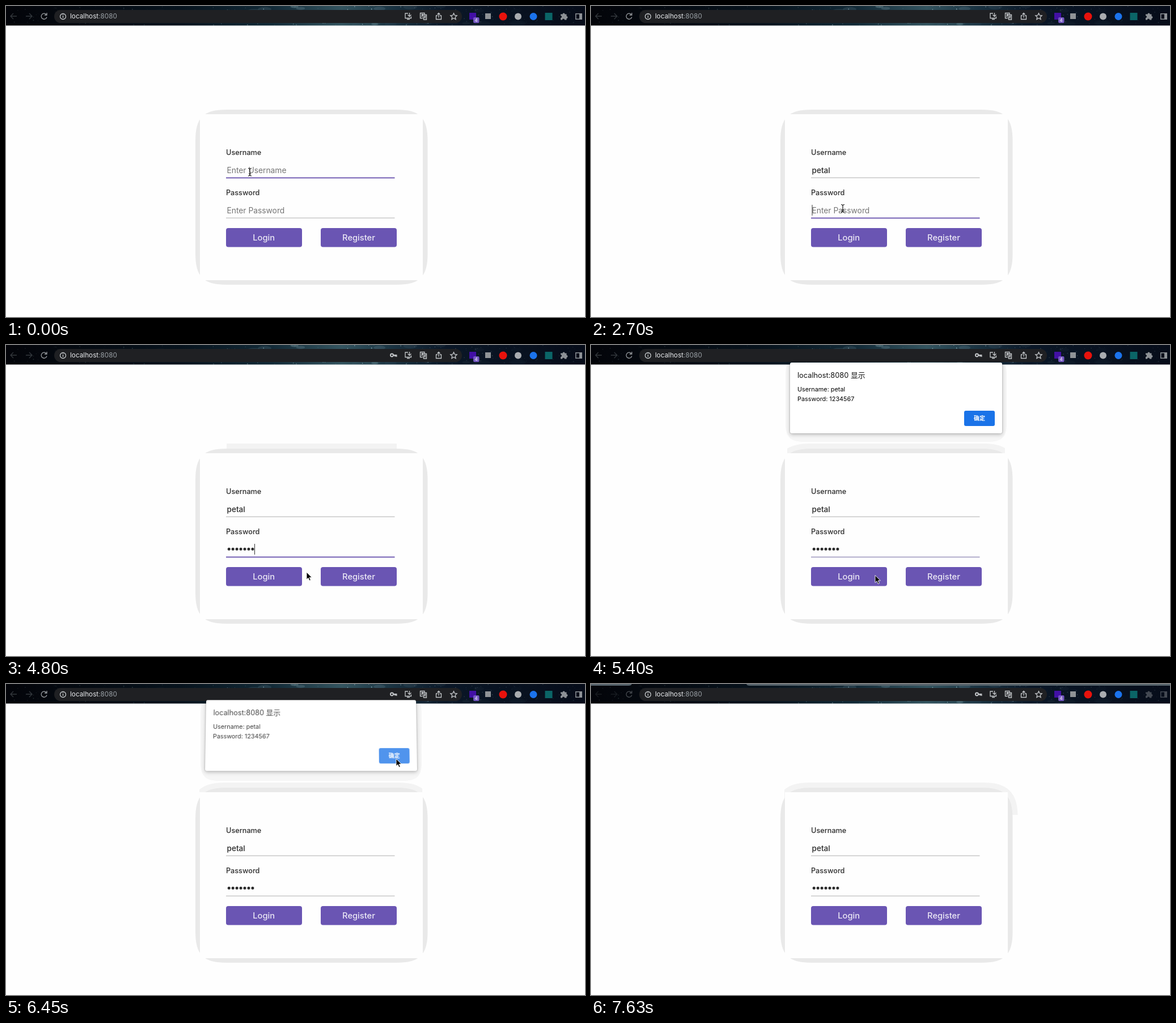
Recreate the animation shown at these times as an HTML page. Size 1021 px wide and 549 px high, loop 7730 ms.

```html
<!DOCTYPE html>
<html lang="en">
<head>
<meta charset="utf-8">
<title>Login form</title>
<style>
  html, body { margin: 0; width: 100%; height: 100%; overflow: hidden; background: #fefefe; }
  body { position: relative; font-family: Inter, "Noto Sans CJK SC", "Noto Sans CJK", sans-serif; }
  svg { position: absolute; left: 0; top: 0; }
  .label { font-size: 12.7px; font-weight: 500; fill: #2c2c2c; }
  .field { font-size: 13.8px; fill: #757575; }
  .typed { fill: #2a2a2a; font-weight: 500; font-size: 13.6px; }
  .button { font-size: 14.7px; font-weight: 500; fill: #ebe8f5; text-anchor: middle; }
  .icon { fill: none; stroke: #c4c7ca; stroke-width: 1.3; }
  #dialog {
    position: absolute; left: 351px; top: 31px; width: 374px; height: 125px;
    background: #fff; border-radius: 3px; transform-origin: 50% 100%;
    box-shadow: 0 0 2px rgba(0,0,0,.35), 0 2px 7px rgba(0,0,0,.25);
  }
  #dialog.tilted { transform: translateY(-2.5px) scaleY(1.016) perspective(1000px) rotateX(5deg); }
  #dialog.tilted svg { opacity: .76; }
</style>
</head>
<body>
<svg width="1021" height="549">
  <defs>
    <linearGradient id="sky">
      <stop offset="0" stop-color="#030409"/>
      <stop offset=".3" stop-color="#07131d"/>
      <stop offset=".46" stop-color="#122a37"/>
      <stop offset=".58" stop-color="#33545f"/>
      <stop offset=".66" stop-color="#1b3543"/>
      <stop offset=".76" stop-color="#0a1727"/>
      <stop offset="1" stop-color="#060c19"/>
    </linearGradient>
    <clipPath id="clip"><rect id="reveal"/></clipPath>
  </defs>

  <path id="dialogHalo" fill="#f6f6f6"/>
  <rect width="1021" height="34.500" fill="url(#sky)"/>
  <g id="stars"></g>
  <path id="tabs" d="M0 0H72Q71 3 66 3H0ZM274 0H1021V3H280Q275 3 274 0Z" fill="#56636b"/>
  <rect x="85" y="7" width="719" height="23" rx="11.5" fill="#1f2023"/>

  <g id="nav" class="icon">
    <path d="M19 18H8m5-5-5 5 5 5M35 18h11m-5-5 5 5-5 5" stroke="#33383d"/>
    <path d="M71 15a5 5 0 1 0 1 4.500M72 12v4h-4" stroke="#969a9e"/>
  </g>
  <g class="icon" stroke-width="1.2">
    <path d="M100.500 17v4M100.500 14.500v1.300"/><circle cx="100.500" cy="18.500" r="5"/>
    <path id="key" d="M683 18h5.500v3M686 18v2.500M683 18a2.500 2.500 0 1 0-5 0a2.500 2.500 0 1 0 5 0" stroke-width="1.900"/>
    <path d="M709 13h-5v8.500h10.500v-3M707 23.500h5M711.500 12v6m-3-2.500 3 3 3-3"/>
    <path d="M738 15v-2.500h-7.500v9h4M735 15.500h6.500v8.500h-5zM732.500 15h3.500M734 14v1q0 3-2 4M737 18h3.500m-1.500-1v1q0 2-2 3.500m1-2 2 2"/>
    <path d="M761 17h-2.500v6.500h9V17H765M763 20.500v-8m-2.500 2.500 2.500-2.500 2.500 2.500"/>
    <path d="m789.500 12.800 1.700 3.700 4 .4-3 2.700.9 4-3.600-2.100-3.600 2.100.9-4-3-2.700 4-.4z"/>
  </g>
  <text x="113" y="22.400" font-size="11.750" fill="#e8eaed">localhost<tspan fill="#9aa0a6">:8080</tspan></text>

  <rect x="817" y="12" width="12" height="12" fill="#4210a5"/>
  <rect x="824" y="20" width="10.500" height="10" rx="2" fill="#7558c2"/>
  <text x="829.200" y="28" font-size="8" fill="#fff" text-anchor="middle">4</text>
  <rect x="845" y="13" width="10" height="10" fill="#8f9397"/>
  <circle cx="876.500" cy="18.500" r="7" fill="#e8120c"/>
  <circle cx="903" cy="18.500" r="6" fill="#a9acb0"/>
  <circle cx="930" cy="18.500" r="6.500" fill="#1b73ec"/>
  <rect x="950.500" y="12" width="13" height="13" fill="#0b6567"/>
  <g id="tools" fill="#8d9196">
    <path d="M978 14.500h3.500a2 2 0 1 1 4 0h3v3.500a2 2 0 1 1 0 4v2.500h-3.500a2 2 0 0 0-4 0h-3v-3.500a2 2 0 0 0 0-4z"/>
    <path d="M1004 13h12v11h-12zm1.500 1.500v8h5.500v-8z" fill-rule="evenodd"/>
  </g>

  <path id="halo" fill="#f3f3f3" clip-path="url(#clip)"/>
  <path id="frame" fill="#e9e9e9"/>
  <rect x="342" y="191" width="393" height="293" fill="#fefefe"/>

  <text class="label" x="388" y="263.300">Username</text>
  <text class="field" id="name" x="389.500" y="294.500"></text>
  <rect id="nameLine" x="388" y="302.500" width="297.500"/>
  <text class="label" x="388" y="334.300">Password</text>
  <text class="field" id="hint" x="389.500" y="365.500">Enter Password</text>
  <path id="dots" fill="none" stroke="#2a2a2a" stroke-width="5" stroke-linecap="round" stroke-dasharray="0 6.950"/>
  <rect id="passLine" x="388" y="373.500" width="297.500"/>
  <rect id="caret" width="1" height="19" fill="#333"/>

  <g fill="#6a55b3">
    <rect x="388" y="392" width="134" height="33.500" rx="4"/>
    <rect x="555" y="392" width="134" height="33.500" rx="4"/>
  </g>
  <text class="button" x="454.700" y="414">Login</text>
  <text class="button" x="622" y="414">Register</text>
</svg>

<div id="dialog">
  <svg width="374" height="125">
    <text x="13" y="27" font-size="12.800" fill="#111">localhost:8080 显示</text>
    <g font-size="10.850" fill="#000">
      <text x="13" y="51">Username: petal</text>
      <text x="13" y="68">Password: 1234567</text>
    </g>
    <rect x="307" y="85" width="54" height="27" rx="3" fill="#1a73e8"/>
    <text x="334" y="102" font-size="10" font-weight="700" fill="#fff" text-anchor="middle">确定</text>
  </svg>
</div>

<svg width="1021" height="549">
  <path id="beam" d="M-3-6.500Q0-6.500 0-4V4.500Q0 7 -3 7M3-6.500Q0-6.500 0-4V4.500Q0 7 3 7M-2 3H2" fill="none" stroke="#111" stroke-width="1.200"/>
  <path id="arrow" d="M0 0V13l3-2.800 2.100 4.900 2.200-.9-2.100-4.800h4.100z" fill="#000" stroke="#fff" stroke-width=".9"/>
</svg>

<script>
const LOOP = 7730, STEP = 150;
const $ = id => document.getElementById(id);
const set = (id, attrs) => {
  for (const key in attrs) $(id).setAttribute(key, attrs[key]);
};
const show = (id, on) => { $(id).style.display = on ? "" : "none"; };

// Rectangle with soft, squarish corners
const softRect = (l, t, r, b, c, k) =>
  `M${l} ${t + c}C${l} ${t + k} ${l + k} ${t} ${l + c} ${t}` +
  `H${r - c}C${r - k} ${t} ${r} ${t + k} ${r} ${t + c}` +
  `V${b - c}C${r} ${b - k} ${r - k} ${b} ${r - c} ${b}` +
  `H${l + c}C${l + k} ${b} ${l} ${b - k} ${l} ${b - c}Z`;
set("frame", { d: softRect(334, 183, 743.5, 492, 55, 14) });
set("halo", { d: softRect(325, 174, 752.5, 501, 60, 18) });
set("dialogHalo", { d: softRect(343, 20, 733, 171, 32, 9) });

// Faint clouds and small stars, densest around the bright band
let seed = 7;
const random = () => (seed = seed * 16807 % 2147483647) / 2147483647;
let stars = "";
for (let i = 0; i < 420; i++) {
  const x = random() * 1021, y = random() * 34.5;
  const glow = Math.exp(-(((x - 560) / 190) ** 2));
  const cloud = i < 60;
  const r = cloud ? 2 + random() * 3 : 0.3 + random() * 0.6;
  const opacity = random() * (cloud ? 0.3 * glow : 0.2 + 0.7 * glow);
  stars += `<ellipse cx="${x}" cy="${y}" rx="${cloud ? 3 * r : r}" ry="${r}" opacity="${opacity}"/>`;
}
$("stars").innerHTML = `<clipPath id="bar"><rect width="1021" height="34.5"/></clipPath><g fill="#a9cbd3" clip-path="url(#bar)">${stars}</g>`;

const USER = "petal";
const userKeys = [450, 450, 900, 1050, 1350];
const passKeys = [2850, 3150, 3300, 3600, 3900, 4200, 4350];
const typed = (keys, t) => keys.filter(k => k <= t).length;

// Pointer stops: time, x, y
const beamPath = [[1800, 430, 293], [2100, 433, 305], [2550, 444, 357]];
const arrowPath = [
  [4500, 590, 390], [4800, 530, 401], [5100, 501, 406.5], [5550, 501, 406.5],
  [5850, 560, 300], [6150, 680, 142], [6300, 688, 132], [6450, 688, 132],
  [6600, 765, 214], [7200, 990, 528]
];
function at(path, t) {
  const i = path.findIndex(p => p[0] > t);
  if (i === 0) return path[0].slice(1);
  if (i < 0) return path[path.length - 1].slice(1);
  const [a, b] = [path[i - 1], path[i]], f = (t - a[0]) / (b[0] - a[0]);
  return [a[1] + (b[1] - a[1]) * f, a[2] + (b[2] - a[2]) * f];
}
const place = (id, path, t) => set(id, { transform: `translate(${at(path, t)})` });

const PURPLE = "#6750ad", GREY = "#c9c9c9";
const underline = (id, fill) => set(id, { fill, height: fill === GREY ? 1.5 : 1.8 });

function draw(now) {
  const time = now % LOOP, t = Math.floor(time / STEP) * STEP;
  const letters = typed(userKeys, t), dots = typed(passKeys, t);
  const inPassword = t >= 2550;

  $("name").textContent = letters ? USER.slice(0, letters) : "Enter Username";
  $("name").classList.toggle("typed", letters > 0);
  show("hint", !dots);
  show("dots", dots);
  set("dots", { d: `M393.2 360.300h${Math.max(0, dots - 1) * 6.95 + 0.1}` });
  underline("nameLine", inPassword ? GREY : PURPLE);
  underline("passLine", !inPassword || t >= 6300 ? GREY : t >= 5250 ? "#aaa4c6" : PURPLE);

  show("caret", (t >= 450 && t < 1800) || (inPassword && t < 5250));
  set("caret", inPassword
    ? { x: 389.5 + dots * 6.93, y: 351 }
    : { x: 390 + $("name").getComputedTextLength(), y: 280 });

  const [x, y, width, height] =
    t >= 6600 ? [341, 174, 412, 57] :
    t >= 6300 ? [341, 170, 393, 21] :
    t >= 5250 ? [346, 170, 384, 21] : [389, 170, 300, 21];
  set("reveal", { x, y, width, height });
  show("halo", t >= 2850);
  show("key", t >= 2850);

  const asking = t >= 5250 && t < 6600;
  show("dialog", asking);
  show("dialogHalo", asking);
  $("dialog").classList.toggle("tilted", t < 5400 || t >= 6450);

  show("beam", t < 2850);
  place("beam", beamPath, t);
  show("arrow", t >= 4500 && time < 7340);
  place("arrow", arrowPath, t);

  const inactive = time >= 7630;
  show("tabs", inactive);
  $("nav").style.opacity = $("tools").style.opacity = inactive ? 0.45 : 1;
}

const start = performance.now();
function tick() {
  draw(performance.now() - start);
  requestAnimationFrame(tick);
}
tick();
</script>
</body>
</html>
```
